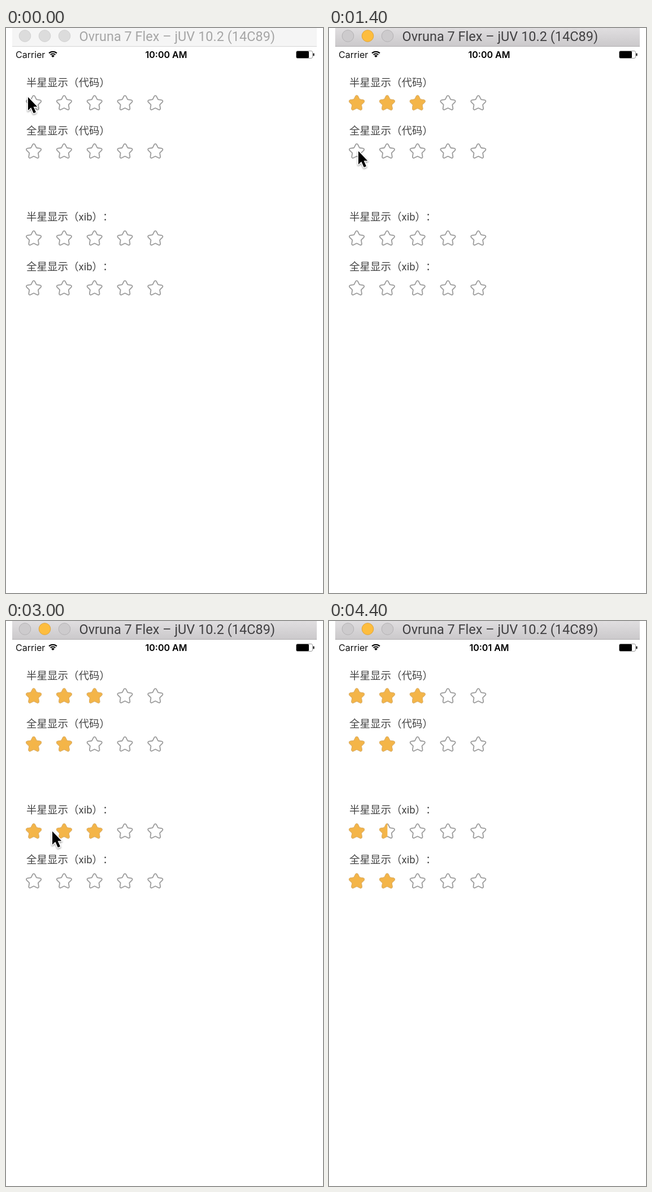
An HTML page with a canvas for the animation above (4800 ms loop, 561 by 998 pixels).

```html
<!DOCTYPE html>
<html lang="zh-CN">
<head>
<meta charset="utf-8">
<title>Star rating</title>
<style>
html, body { margin: 0; width: 100%; height: 100%; overflow: hidden; background: #fff; }
canvas { display: block; width: 561px; height: 998px; }
</style>
</head>
<body>
<canvas id="stage" width="561" height="998"></canvas>
<script>
const ctx = document.getElementById('stage').getContext('2d');
const LOOP = 4800, STEP = 200;
const LABEL_FONT = '18.5px Roboto, "Noto Sans CJK SC", sans-serif';

// Pointer tip for each step; hidden after the last one.
const pointer = [
  [39, 122], [50, 133], [55, 133], [153, 133], [49, 133], [154, 133],
  [183, 137], [52, 217.5], [52, 218.5], [95, 218.5], [34, 364.5], [49, 368],
  [126, 372.5], [139, 372], [147, 371.5], [82, 371.5], [125, 405], [100, 454],
  [498, 531.5]
];

// Each score is [step, stars], held until the next entry.
const rows = [
  { label: '半星显示（代码）', base: 102.8, y: 133, scores: [[1, .5], [3, 2.5], [4, .5], [5, 2.5], [6, 3]] },
  { label: '全星显示（代码）', base: 187.8, y: 218.3, scores: [[8, 1], [10, 2]] },
  { label: '半星显示（xib）：', base: 339.8, y: 372, scores: [[11, .5], [13, 2], [14, 3], [16, 1.5]] },
  { label: '全星显示（xib）：', base: 427.8, y: 460, scores: [[18, 2]] }
];

function text(str, x, y, font, color, align = 'left') {
  ctx.font = font;
  ctx.fillStyle = color;
  ctx.textAlign = align;
  ctx.fillText(str, x, y);
}

// Sets glyphs one by one so that full-width punctuation keeps its full advance.
function drawLabel(str, x, y) {
  for (const ch of str) {
    text(ch, x, y, LABEL_FONT, '#444');
    x += ctx.measureText(ch).width;
  }
}

function disc(x, y, r, fill, edge) {
  ctx.beginPath();
  ctx.arc(x, y, r, 0, 7);
  ctx.fillStyle = fill;
  ctx.fill();
  ctx.strokeStyle = edge;
  ctx.lineWidth = 1;
  ctx.stroke();
}

function starPath() {
  const p = [];
  for (let i = 0; i < 10; i++) {
    const a = i * Math.PI / 5, r = i % 2 ? 8.2 : 16.1;
    p.push([r * Math.sin(a), -r * Math.cos(a)]);
  }
  const path = new Path2D();
  path.moveTo((p[9][0] + p[0][0]) / 2, (p[9][1] + p[0][1]) / 2);
  p.forEach((a, i) => path.arcTo(...a, ...p[(i + 1) % 10], i % 2 ? 1 : 2));
  path.closePath();
  return path;
}
const star = starPath();

function drawStar(x, y, amount) {
  ctx.save();
  ctx.translate(x, y);
  ctx.lineWidth = 1.8;
  ctx.strokeStyle = '#9b9b9b';
  ctx.stroke(star);
  if (amount > 0) {
    ctx.beginPath();
    ctx.rect(-16, -17, amount < 1 ? 16.5 : 32, 34);
    ctx.clip();
    ctx.fillStyle = '#f4b548';
    ctx.strokeStyle = '#ecb354';
    ctx.fill(star);
    ctx.stroke(star);
  }
  ctx.restore();
}

function drawTitleBar(active) {
  let fill = '#f5f5f5';
  if (active) {
    fill = ctx.createLinearGradient(0, 0, 0, 32);
    fill.addColorStop(0, '#e0dee0');
    fill.addColorStop(1, '#cbc9cb');
  }
  ctx.fillStyle = fill;
  ctx.fillRect(11, 0, 539, 32);
  ctx.fillStyle = active ? '#b0aeb0' : '#d5d5d5';
  ctx.fillRect(11, 32, 539, 1);
  [33.5, 68.5, 103.5].forEach((x, i) => {
    if (!active) disc(x, 14, 10.3, '#dcdcdc', '#d0d0d0');
    else if (i === 1) disc(x, 14, 10.3, '#fdbd3e', '#dfa43a');
    else disc(x, 14, 10.3, '#cdcbcd', '#b4b2b4');
  });
  text('Ovruna 7 Flex – jUV 10.2 (14C89)', 129.5, 23, '23.5px Roboto, sans-serif',
    active ? '#414042' : '#a6a6a6');
}

function drawStatus(clock) {
  text('Carrier', 17, 52.7, '16px Inter, sans-serif', '#111');
  text(clock, 283.5, 52.7, '600 16px Inter, sans-serif', '#000', 'center');

  ctx.strokeStyle = '#000';
  ctx.lineWidth = 2.1;
  const a = Math.PI / 4;
  [6, 9.8].forEach(r => {
    ctx.beginPath();
    ctx.arc(83, 51.5, r, -3 * a, -a);
    ctx.stroke();
  });
  ctx.fillStyle = '#000';
  ctx.beginPath();
  ctx.moveTo(83, 52);
  ctx.arc(83, 52, 4, -3 * a, -a);
  ctx.fill();

  ctx.lineWidth = 1;
  ctx.strokeStyle = '#999';
  ctx.beginPath();
  ctx.roundRect(513.5, 40.5, 29, 13, 2.5);
  ctx.stroke();
  ctx.beginPath();
  ctx.roundRect(514, 41, 22, 12, 1.5);
  ctx.fill();
  ctx.beginPath();
  ctx.roundRect(543.5, 44.5, 2, 5, 1);
  ctx.fill();
}

const arrow = new Path2D('M0 0V23.5L5.3 18.6L9.8 28.6L14 26.8L9.6 17H16.3Z');

function drawPointer([x, y]) {
  ctx.save();
  ctx.translate(x, y);
  ctx.lineJoin = 'round';
  ctx.lineWidth = 3;
  ctx.strokeStyle = '#fff';
  ctx.shadowColor = 'rgba(0,0,0,.4)';
  ctx.shadowBlur = 3;
  ctx.shadowOffsetY = 1.5;
  ctx.stroke(arrow);
  ctx.shadowColor = 'transparent';
  ctx.fillStyle = '#000';
  ctx.fill(arrow);
  ctx.restore();
}

function scoreAt(scores, step) {
  return scores.reduce((held, [at, n]) => step >= at ? n : held, 0);
}

function draw(ms) {
  const step = Math.floor(ms % LOOP / STEP);
  ctx.fillStyle = '#fff';
  ctx.fillRect(0, 0, 561, 998);
  drawTitleBar(step > 0);
  drawStatus(step < 22 ? '10:00 AM' : '10:01 AM');
  for (const row of rows) {
    drawLabel(row.label, 36, row.base);
    const score = scoreAt(row.scores, step);
    for (let i = 0; i < 5; i++) {
      drawStar(49.1 + i * 53.8, row.y, Math.max(0, Math.min(1, score - i)));
    }
  }
  if (pointer[step]) drawPointer(pointer[step]);
}

const start = performance.now();
function tick() {
  draw(performance.now() - start);
  requestAnimationFrame(tick);
}
tick();
</script>
</body>
</html>
```
